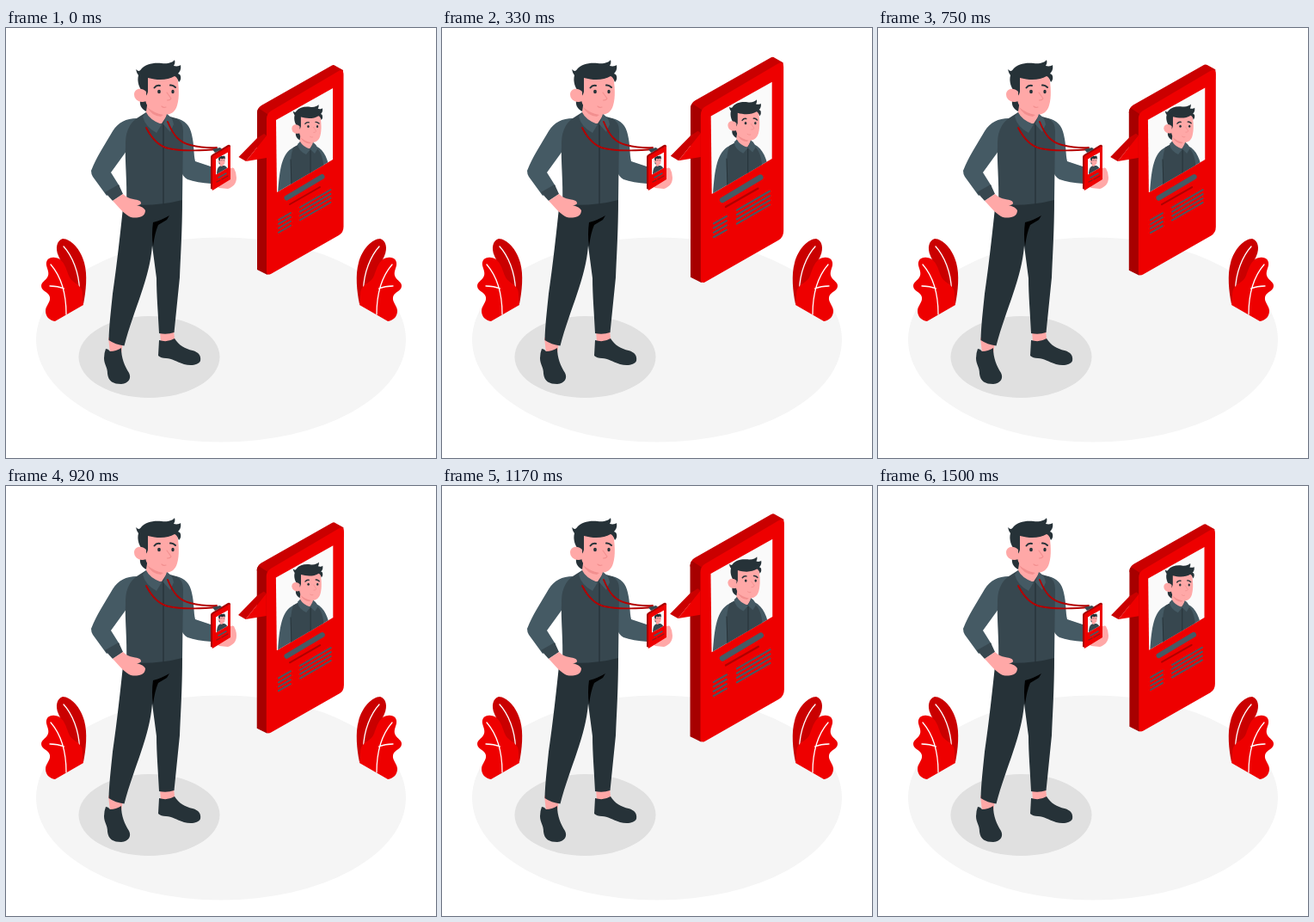
Animation, 500 px wide and 500 px high, one loop 1.54 s. Source, as an HTML page:

```html
<!DOCTYPE html>
<html lang="en">
<head>
<meta charset="utf-8">
<title>ID card</title>
<style>
html, body { margin: 0; width: 100%; height: 100%; overflow: hidden; background: #fff; }
svg { display: block; width: 100vw; height: 100vh; }
.red { fill: #ee0000; }
.deep { fill: #ca0000; }
.shade { fill: #a70000; }
.skin { fill: #ffa8a7; }
.ink { fill: #263238; }
.coat { fill: #455a64; }
.body { fill: #37474f; }
.line { fill: none; stroke-linecap: round; stroke-linejoin: round; }
</style>
</head>
<body>
<svg viewBox="0 0 500 500">
  <defs>
    <clipPath id="photo"><path d="M314 107L380 70V153L315 191Z"/></clipPath>
    <clipPath id="mini"><path d="M244 152.500L258 144.500V162.500L244 170.500Z"/></clipPath>

    <g id="plant">
      <path class="deep" d="M90 321C93 306 95 287 91 273C87 257 75 245 66 245C59 247 57 256 61 265C66 276 72 287 73 304Z"/>
      <path class="line" d="M67 254C77 265 85 284 85.500 305" stroke="#fff" stroke-width="1.300"/>
      <path class="red" d="M57 341L90 322C88 314 90 309 88 304C85 297 76 296 73 288C70 280 67 268 57 267C50 266 46 270 47 276C48 281 51 285 48 290C46 294 41 295 41 300C41 306 50 307 51 313C52 319 46 323 46 329C46 335 50 340 57 341Z"/>
      <path class="line" d="M52 275C65 290 70 310 70 333M51 300Q60 300 67.500 303" stroke="#fff" stroke-width="1.300"/>
    </g>

    <g id="head">
      <path class="skin" d="M163 84L163 103Q170 113 181 111L187 102L186 93Z"/>
      <path class="ink" d="M157 82C154 88 157 94 163 97L165 84Z"/>
      <path class="skin" d="M162 58L199 55C201 68 202 80 199 90C197 97 192 101 185 101C174 100 164 95 162 84Z"/>
      <path d="M164 92Q172 99 183 101L180 103Q169 102 164 92Z" fill="#f28f8f"/>
      <path class="ink" d="M160 75C155 71 152 62 154 55Q152 53 151 48C154 51 156 50 157 48C162 42 171 40 181 41C188 42 194 40 196 37C197 40 196 42 195 44C199 45 202 44 203 43C204 48 202 51 200 53Q203 54 203 56Q204 60 201 63Q199 57 196 56C188 61 176 61 165 58L165 74Q164 79 161 80Z"/>
      <path class="skin" d="M163 74C157 68 149 71 149 77C149 83 155 88 163 85Z"/>
      <ellipse class="ink" cx="178" cy="74" rx="1.900" ry="2.200"/>
      <ellipse class="ink" cx="194" cy="74" rx="1.700" ry="2.200"/>
      <path class="line" d="M172.500 69.500Q175 66 179 67M191 66.500Q194 66 197 69" stroke="#263238" stroke-width="2"/>
      <path class="line" d="M187 75Q190 79 192 82Q191 84 187.500 84M181 91Q183 93 186 92" stroke="#f28f8f" stroke-width="1.100"/>
    </g>
  </defs>

  <rect width="500" height="500" fill="#fff"/>
  <ellipse cx="250" cy="362.500" rx="215" ry="119" fill="#f5f5f5"/>
  <ellipse cx="166.500" cy="382.500" rx="82" ry="47.500" fill="#e0e0e0"/>
  <use href="#plant"/>
  <use href="#plant" transform="translate(501 0) scale(-1 1)"/>

  <!-- legs -->
  <path class="skin" d="M119 360L136 366L134 378L121 378Z"/>
  <path class="skin" d="M179 351L195 351L196.500 366L180 366Z"/>
  <path class="ink" d="M116 373Q119 373 121 376Q128 376 134 372C134 384 138 393 143 401C146 407 143 413 134 414C125 414 119 411 118 402C118 394 114 391 114 384Q114 378 116 373Z"/>
  <path class="ink" d="M178 363Q188 366 196 361C201 369 208 373 217 375C224 377 227 381 226 387C224 392 215 393 207 391C198 388 193 384 186 384Q180 384 177 381Z"/>
  <path class="ink" d="M137 200L205 198C205 235 203 265 202 290L195.500 354Q187 357 178 355C177 333 175 310 175 291L170 253C167 292 149 326 137.500 369.500Q127 368 119.500 363C120 345 122 329 124 309C129 275 133 238 137 200Z"/>
  <path d="M171 226Q182 223 190 218L187 223L177 229Q173 238 171 254Q169 240 171 226Z"/>

  <!-- arms and jacket -->
  <path class="coat" d="M152 105C140 105 130 110 124 120C116 134 105 150 99 166Q99 170 101 173L117 195L132 184L122 168L143 139Z"/>
  <path class="body" d="M115 191L131 182L136 193L124 201Z"/>
  <path class="coat" d="M198 105C208 107 214 114 216 124C219 136 218 147 220 155L241 162L239 181Q222 180 211 176Q204 172 203 163Z"/>
  <path class="body" d="M152 105L163 98L187 102L198 105Q206 109 206 120L205 200Q174 208 140 205C141 178 138 153 139 138Q138 115 152 105Z"/>
  <path class="line" d="M183 112V205" stroke="#263238" stroke-width="1.300"/>
  <path class="skin" d="M124 201L136 193Q141 198 148 199C154 200 157 201 157 204Q156 206 152 206Q160 208 162 212Q162 217 158 219C152 221 147 221 143 219C136 215 130 207 124 201Z"/>
  <use href="#head"/>
  <path class="coat" d="M163 98Q167 107 181 112L175 122Q162 115 159 103Z"/>
  <path class="coat" d="M187 100Q194 104 195 112L191 121L183 112Z"/>
  <path class="line" d="M163 116Q174 137 189 140C207 144 228 142 247 141M188 109C195 126 202 133 214 136Q231 140 245 139" stroke="#b40000" stroke-width="1.900"/>

  <!-- badge in hand -->
  <path class="skin" d="M241 164L258 167Q261 161 265 163Q268 168 268 174C268 181 264 185 258 187L248 186L240 181Z"/>
  <path class="shade" d="M238 150Q238 148 240 147L258 136Q260 135 261 137V166L241 188L238 187Z"/>
  <path class="red" d="M240 151Q240 149 242 148L259 138Q261 137 261 139V176L240 189Z"/>
  <path class="body" d="M240 141L249 139L251 141L243 145Z"/>
  <path d="M244 152.500L258 144.500V162.500L244 170.500Z" fill="#fafafa"/>
  <g clip-path="url(#mini)">
    <path class="body" d="M245 172C245 163 247 161 250 160H254Q258 161 258 168Z"/>
    <use href="#head" transform="matrix(.16 0 0 .17 222.500 142)"/>
  </g>
  <path class="line" d="M247 174L256 169" stroke="#455a64" stroke-width="1.500"/>
  <path class="line" d="M245 179L249 177M251 176L258 172" stroke="#8d1b1b" stroke-width="1.300"/>

  <!-- large card -->
  <g id="card">
    <path class="deep" d="M292 99Q292 93 297 90L379 43.500Q381 42.500 383 44L392 49L392 60L303 110Z"/>
    <path class="shade" d="M292 98Q292 95 294 93.500L304 100V287L292 281Z"/>
    <path class="red" d="M303 106Q303 99.500 308 96.500L386 50.500Q392.500 47 392.500 54V231Q392.500 238 387 241L308 286Q303 288.500 303 283Z"/>
    <path class="deep" d="M292 128L300 123L303 125L279 155L270.500 150Z"/>
    <path class="red" d="M279 155L303 125V151Z"/>
    <path d="M314 107L380 70V153L315 191Z" fill="#fafafa"/>
    <g clip-path="url(#photo)">
      <path class="coat" d="M316 194C318 166 320 146 334 139L343 134L357 136C368 139 373 149 376 162L370 195Z"/>
      <path class="body" d="M334 139L343 134L357 137Q367 141 369 158L368 195H331C333 172 328 156 334 139Z"/>
      <path class="line" d="M354 142V178M331 153L332 184" stroke="#263238" stroke-width=".9"/>
      <use href="#head" transform="matrix(.66 0 0 .69 234 63.500)"/>
      <path class="coat" d="M342 132Q345 138 354 141L349 147Q340 143 339 135Z"/>
      <path class="coat" d="M357 133Q362 136 362 141L359 146L354 141Z"/>
    </g>
    <path class="line" d="M326.500 197.500L367.500 173" stroke="#455a64" stroke-width="6"/>
    <path class="line" d="M330 205L365 185" stroke="#b00000" stroke-width="2"/>
    <path id="rows" class="line" stroke="#455a64" stroke-width="1.900"/>
  </g>
</svg>
<script>
const LOOP = 1540, FPS = 24, LAST = 36;
const PIVOT = [331.5, 165];
// [ms, pulse]: scale runs from 1 to 1.1
const BEATS = [[0, .1], [270, .98], [840, 0], [865, 0], [1170, 1], [1495, 0], [1508, 0], [1540, .1]];
const card = document.getElementById("card");

function drawRows() {
  let d = "";
  for (let i = 0; i < 4; i++) {
    const y = i * 4.9;
    d += `M317 ${223 + y}L331 ${215 + y}M342 ${208.500 + y}L377.500 ${188 + y}`;
  }
  document.getElementById("rows").setAttribute("d", d);
}

function pulse(t) {
  const i = BEATS.findIndex(b => b[0] > t);
  const [t0, v0] = BEATS[i - 1], [t1, v1] = BEATS[i];
  return v0 + (v1 - v0) * (t - t0) / (t1 - t0);
}

function draw(ms) {
  const t = ms % LOOP;
  const step = Math.min(LAST, Math.floor((t + 4) * FPS / 1000));
  const s = (1 + .1 * pulse(step * 1000 / FPS)) / 1.01;
  const [x, y] = PIVOT;
  card.setAttribute("transform", `translate(${x} ${y}) scale(${s}) translate(${-x} ${-y})`);
}

let start;
function tick(now) {
  start ??= now;
  draw(now - start);
  requestAnimationFrame(tick);
}

drawRows();
draw(0);
requestAnimationFrame(tick);
</script>
</body>
</html>
```
